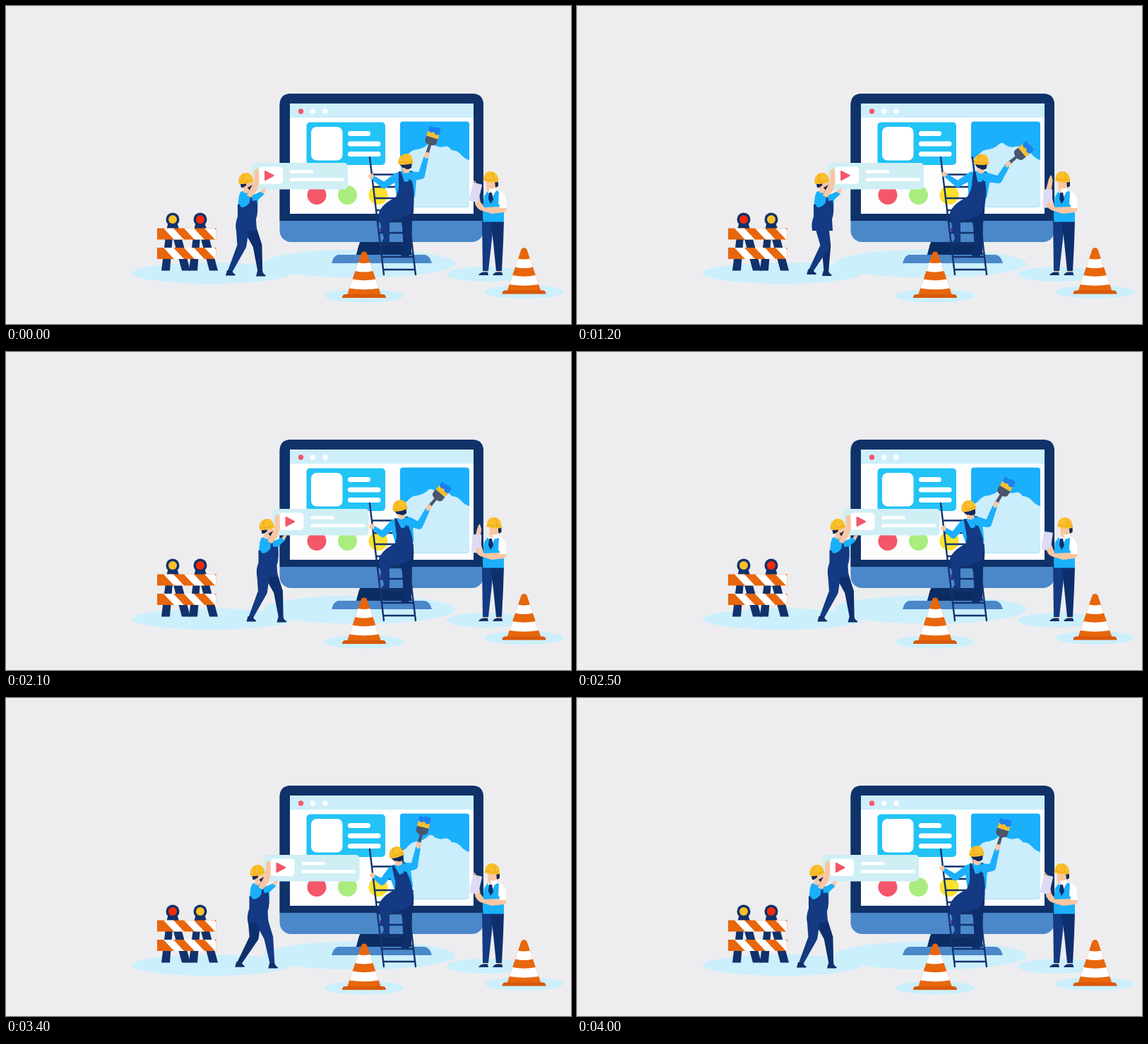
These frames come from a looping animation (800 by 450 pixels, 4.1 s). An HTML page:

```html
<!DOCTYPE html>
<html lang="en">
<head>
<meta charset="utf-8">
<title>Site under construction</title>
<style>
  html, body { margin: 0; width: 100%; height: 100%; overflow: hidden; background: #ededef; }
  svg { display: block; width: 800px; height: 450px; }
  .navy { fill: #11316b; }
  .denim { fill: #133a82; }
  .shade { fill: #0e2f6d; }
  .shirt { fill: #1bb0fb; }
  .skin { fill: #f9c6a3; }
  .white { fill: #fff; }
  .pale { fill: #cceffc; }
  .orange { fill: #e8660c; }
  .red { fill: #f4566a; }
</style>
</head>
<body>
<svg viewBox="0 0 800 450">
  <defs>
    <g id="helmet">
      <path fill="#fabf2b" d="M-10.5 5C-11-4-5-8 1-8C7-8 10-3 10 3L11.500 5Q0 9-10.500 7Z"/>
      <path fill="none" stroke="#e9a51d" stroke-width="1" d="M-10 4Q0 6 10 2.500M-2-7Q-5-3-4 3"/>
    </g>
    <g id="cone">
      <ellipse class="pale" cx="507" cy="410" rx="56" ry="9.500"/>
      <path class="orange" d="M503 350Q504 347.500 507 347.500T511 350L531 409H483Z"/>
      <path class="white" d="M498.600 363Q507 365 515.400 363L519.400 375Q507 378 494.600 375ZM490.700 386.500Q507 390 523.300 386.500L527.700 399.500Q507 403 486.300 399.500Z"/>
      <path fill="#d9580a" d="M476 413Q476 408 481 408H533Q538 408 538 413Z"/>
    </g>
    <g id="trestle">
      <path class="navy" d="M229 309H243L247 322L261 374.500H249L236 326L232 374.500H220L227 318Z"/>
      <circle class="navy" cx="236" cy="302" r="9.500"/>
    </g>
    <g id="stripes">
      <path class="orange" d="M214 314.500H297.500V330.500H214Z"/>
      <path class="white" d="M223 314.500H237L252 330.500H238ZM252 314.500H266L281 330.500H267ZM281 314.500H295L297.500 317V330.500H296Z"/>
    </g>
    <path id="shoe" class="navy" d="M-4-2H3Q4 2 8 4L7 5.500H-6Z"/>
    <clipPath id="photo"><rect x="558" y="163.500" width="98" height="121" rx="4"/></clipPath>
  </defs>

  <g class="pale">
    <ellipse cx="291" cy="378" rx="113" ry="15"/>
    <ellipse cx="500" cy="364.500" rx="136" ry="20"/>
    <ellipse cx="680" cy="379.500" rx="56" ry="10.500"/>
  </g>

  <!-- monitor -->
  <rect x="387.500" y="124" width="288.500" height="210" rx="16" fill="#4b88c9"/>
  <path fill="#0f3268" d="M387.500 304V140Q387.500 124 403.500 124H660Q676 124 676 140V304Z"/>
  <path fill="#0c2d63" d="M501 334H571L575 352.500H496Z"/>
  <path fill="#4b88c9" d="M470 352H593Q600 353 603 364H461Q464 353 470 352Z"/>
  <path fill="#0c2d63" d="M500 337H571L575 352H496Z"/>
  <rect x="402" y="138" width="260" height="156" fill="#fdfdfe"/>
  <rect x="402" y="138" width="260" height="20" fill="#cdeffb"/>
  <circle class="red" cx="417.500" cy="149" r="3.700"/>
  <g class="white"><circle cx="434.500" cy="149" r="3.700"/><circle cx="452" cy="149" r="3.700"/></g>

  <rect x="425.500" y="164.500" width="111.500" height="60.500" rx="5" fill="#23c3f6"/>
  <g class="white">
    <rect x="432" y="171" width="44.500" height="47.500" rx="8"/>
    <rect x="484" y="177" width="32" height="7" rx="3.500"/>
    <rect x="484" y="191.500" width="46.500" height="7" rx="3.500"/>
    <rect x="484" y="206" width="46.500" height="7" rx="3.500"/>
  </g>
  <g clip-path="url(#photo)">
    <path class="shirt" d="M558 163H656V285H558Z"/>
    <path fill="#ccedfb" d="M558 217Q565 215 570 209T583 203Q592 201 597 196T607 197Q614 201 620 199T631 204Q639 204 644 210T656 218V285H558Z"/>
  </g>
  <circle class="red" cx="440" cy="267.500" r="13.500"/>
  <circle fill="#aaed7e" cx="483.500" cy="267.500" r="13.500"/>
  <circle fill="#fbe12d" cx="527" cy="267.500" r="13.500"/>

  <!-- barricade -->
  <use href="#trestle"/><use href="#trestle" x="39"/>
  <circle id="lampL" cx="236" cy="302" r="6"/>
  <circle id="lampR" cx="275" cy="302" r="6"/>
  <use href="#stripes"/><use href="#stripes" y="27.500"/>

  <!-- carrier and video panel -->
  <g id="carrier">
    <rect x="348" y="222" width="136" height="37.500" rx="5" fill="#cfeff5"/>
    <g class="white">
      <rect x="357.500" y="227.500" width="34.500" height="24.500" rx="5"/>
      <rect x="402" y="232" width="33" height="4.700" rx="1.500"/>
      <rect x="402" y="243.300" width="76.500" height="4.700" rx="1.500"/>
    </g>
    <path class="red" stroke="#f4566a" stroke-width="2" stroke-linejoin="round" d="M367 234L378.500 240L367 246Z"/>
    <path class="shirt" d="M345 270L362 262L366 266L352 279Z"/>
    <path class="skin" d="M361 263L365 258L368 260L365 266Z"/>
    <path id="legB" class="shade"/><use id="shoeB" href="#shoe"/>
    <path id="legA" class="denim"/><use id="shoeA" href="#shoe"/>
    <path class="shirt" d="M332 263Q338 260 346 263L357 270L356 288L330 290Q327 275 332 263Z"/>
    <path class="denim" d="M328 280Q334 284 341 277L344 265L347 265L349 276L355 275Q358 290 354 302L355 318L326 318Q324 308 328 298Z"/>
    <path class="skin" d="M336 250H349V257Q347 262 343 262L342 266L336 264Z"/>
    <path fill="#14295a" d="M331 248H341L340 254Q336 258 333 257ZM342 257L349 253L348 259L345 261Z"/>
    <use href="#helmet" transform="translate(339.500 244) rotate(-4)"/>
    <path class="shirt" d="M330 274Q329 264 336 264L346 266L345 278Q338 287 332 284Z"/>
    <path class="skin" d="M341 268L351 249L351.500 233Q354 229 358 231L358.500 248L355 261L347 271Z"/>
  </g>

  <!-- ladder and painter -->
  <path id="ladder" fill="none" stroke="#14336e" stroke-width="2.400" stroke-linecap="round"/>
  <path class="shade" d="M556 288L577 276Q578 290 575 306L574 347L570 354H559L563 347L561 312Z"/>
  <ellipse cx="532" cy="317" rx="2.500" ry="3.500" fill="#3c2b86"/>
  <path class="denim" d="M553 270Q536 278 530 288Q526 294 529 303L535 329L531 335H543L543 329L543 304Q566 300 574 292L577 272Z"/>
  <path id="armL" class="shirt"/><circle id="handL" class="skin" r="3.700"/>
  <g id="torso">
    <path class="shirt" d="M549 243Q551 236 559 234L573 233Q580 236 581 244L579 270H553Z"/>
    <path class="denim" d="M556 234L559 234L564 249L570 248L573 233L576 234L575 250Q579 261 577 284L552 284Q548 276 553 268Q557 260 556 251Z"/>
    <path class="skin" d="M560 224H572L571 235Q566 238 562 235Z"/>
    <path fill="#14295a" d="M557 220H575L574 229Q568 233 564 229Q560 230 557 222Z"/>
    <use href="#helmet" x="566" y="217"/>
  </g>
  <path id="armR" class="shirt"/>
  <g id="brush">
    <path fill="#4a566c" d="M-2.500 2L-2-14Q-8-15-8.500-19V-25H8.500V-19Q8-15 2-14L2.500 2Z"/>
    <path fill="#1b80f2" d="M-8.500-28V-40L-3-39L2-41L8.500-40V-28Z"/>
    <path fill="#f8bf30" d="M-8.500-25V-33L-4-31L0-33L4-30L8.500-32V-25Z"/>
  </g>
  <path id="handR" class="skin"/>

  <!-- inspector -->
  <g class="skin"><path d="M676 372H682V378H676ZM695 372H701V378H695Z"/></g>
  <path class="navy" d="M669 381Q671 377 676 376.500H682L683 381ZM689 381Q691 377 695 376.500H702L703.500 381Z"/>
  <path class="denim" d="M674 304H690L688 330L683 375H675Z"/>
  <path class="shade" d="M686 304H705L704 335L702 375H694L690 335Z"/>
  <path class="white" d="M677 268Q680 262 688 261L699 262Q708 265 708 276L709 288L698 290L679 284Z"/>
  <path class="shirt" d="M677 269L682 262L687 274L694 261L698 263L697 280L705 287V305.500H675.500Q674 290 677 269Z"/>
  <path class="shade" d="M684 264H688L690 274L686 280L683 273Z"/>
  <g id="face">
    <path class="skin" d="M680 246H695L694 261Q690 265 686 264Q681 262 680 258Z"/>
    <path fill="#14295a" d="M692 247H697V255L693 257Z"/>
    <path class="white" d="M684 258Q690 260 693 256L694 262Q689 266 685 263Z"/>
    <use href="#helmet" transform="translate(686.500 242) scale(-1 1)"/>
  </g>
  <path id="raised" class="skin"/>
  <rect id="board" x="-6.500" y="-13" width="13" height="26" rx="1" fill="#dddbf4"/>
  <path id="pen" stroke="#f0c9a0" stroke-width="1.500" d="M662 247L669 255"/>
  <path class="skin" d="M708 283Q711 289 705 292L688 294L672 289Q666 286 665 280L668 276L672 281L677 285L698 284Z"/>
  <path class="white" d="M698 265Q706 264 707 274L709 286L699 286Z"/>

  <use href="#cone"/><use href="#cone" x="226.500" y="-5.500"/>
</svg>
<script>
const LOOP = 4100, STEP = 100, CYCLE = 4000;
const $ = id => document.getElementById(id);
const set = (id, name, value) => $(id).setAttribute(name, value);
const clamp = v => Math.min(1, Math.max(0, v));
const mix = (a, b, k) => a.map((v, i) => v + (b[i] - v) * k);

const times = [0, 500, 1200, 2100, 2900, 3400];
const keys = {
  lean: [0, 6, 6, -7.5, -12, -12],
  handX: [596, 608.5, 611, 599, 588, 584.5],
  handY: [210, 217, 223, 219, 210, 207],
  elbowX: [588, 593, 597, 585, 580, 578],
  elbowY: [240, 245, 246, 246, 240, 238],
  brush: [17, 38, 50, 40, 21, 13.5],
  gripX: [517, 520, 520, 518, 520, 519],
  gripY: [241, 238, 238, 247, 251, 251],
  head: [0, 0, 1, 4.5, 4, 2],
  raise: [0, 0.85, 1, 0.85, 0, 0]
};

// Smooth cyclic curve through the key values
function sample(name, t) {
  const v = keys[name], n = times.length;
  const at = i => v[(i + n) % n];
  const when = i => times[(i + n) % n] + Math.floor(i / n) * CYCLE;
  t %= CYCLE;
  let i = n - 1;
  while (times[i] > t) i--;
  const slope = j => (at(j + 1) - at(j - 1)) / (when(j + 1) - when(j - 1));
  const d = when(i + 1) - when(i), u = (t - when(i)) / d, w = 1 - u;
  return (1 + 2 * u) * w * w * at(i) + u * w * w * d * slope(i)
    + u * u * (3 - 2 * u) * at(i + 1) - u * u * w * d * slope(i + 1);
}

// Tapered limb with round joints
function limb(points, widths) {
  let d = "";
  points.forEach(([x, y], i) => {
    const r = widths[i] / 2;
    d += `M${x - r} ${y}a${r} ${r} 0 1 0 ${2 * r} 0a${r} ${r} 0 1 0 ${-2 * r} 0Z`;
    if (!i) return;
    const [px, py] = points[i - 1], q = widths[i - 1] / 2;
    const len = Math.hypot(x - px, y - py) || 1;
    const nx = (py - y) / len, ny = (x - px) / len;
    d += `M${px + nx * q} ${py + ny * q}L${x + nx * r} ${y + ny * r}`
      + `L${x - nx * r} ${y - ny * r}L${px - nx * q} ${py - ny * q}Z`;
  });
  return d;
}

function leg(id, cos, sin) {
  const k = (1 - cos) / 2;
  const knee = mix([334, 339], [356, 339], k);
  const ankle = mix([317, 376], [360, 377], k);
  ankle[0] -= sin > 0 ? 13 * sin : 6 * sin;
  ankle[1] -= Math.max(0, 2 * sin);
  set("leg" + id, "d", limb([mix([335, 311], [344, 311], k), knee, ankle], [19, 13, 6.5]));
  set("shoe" + id, "transform", `translate(${ankle})`);
}

function carrier(t) {
  const p = clamp((t - 960) / 1000) - clamp((t - 2960) / 1000);
  const a = p * 2 * Math.PI;
  set("carrier", "transform", `translate(${29.5 * p} 0)`);
  leg("A", Math.cos(a), Math.sin(a));
  leg("B", -Math.cos(a), -Math.sin(a));
}

function painter(t) {
  const lean = sample("lean", t), a = lean * Math.PI / 180;
  const turn = (x, y) => [
    565 + (x - 565) * Math.cos(a) - (y - 282) * Math.sin(a),
    282 + (x - 565) * Math.sin(a) + (y - 282) * Math.cos(a)
  ];
  const hand = [sample("handX", t), sample("handY", t)];
  const elbow = [sample("elbowX", t), sample("elbowY", t)];
  const grip = [sample("gripX", t), sample("gripY", t)];
  const left = turn(554, 241), right = turn(576, 241);
  const bend = mix(left, grip, 0.5);
  bend[1] += 13;
  set("torso", "transform", `rotate(${lean} 565 282)`);
  set("armL", "d", limb([left, bend, mix(bend, grip, 0.85)], [11, 9, 6]));
  set("handL", "cx", grip[0]);
  set("handL", "cy", grip[1]);
  set("armR", "d", limb([right, elbow, mix(elbow, hand, 0.82)], [13, 10, 7]));
  set("handR", "d", limb([mix(elbow, hand, 0.88), hand], [5, 6.5]));
  set("brush", "transform", `translate(${hand}) rotate(${sample("brush", t)})`);
}

function inspector(t) {
  const up = clamp(sample("raise", t));
  const hand = mix([668, 272], [670.5, 247], up);
  const tip = mix([667, 268], [671, 241], up);
  const board = mix([665, 264], [666.5, 272.5], up);
  set("face", "transform", `translate(${sample("head", t)} 0)`);
  set("raised", "d", limb([[672, 284], mix([668, 279], [667, 265], up), hand, tip], [8, 8, 6, 2.5]));
  set("board", "transform", `translate(${board}) rotate(${13 - 12 * up})`);
  set("pen", "opacity", up < 0.3 ? 1 : 0);
}

function lamps(t) {
  const swap = Math.floor(t / 1000) % 2;
  const colors = ["#fbbf28", "#f32a05"];
  set("lampL", "fill", colors[swap]);
  set("lampR", "fill", colors[1 - swap]);
}

let rungs = "M515 214L535 380M560 214L580 380";
for (const y of [238.5, 256, 272, 289, 305, 321, 337, 355, 373])
  rungs += `M${515 + (y - 214) * 0.12} ${y}h45`;
set("ladder", "d", rungs);

const start = performance.now();
let last = -1;
function tick() {
  const t = Math.floor((performance.now() - start) % LOOP / STEP) * STEP;
  if (t !== last) {
    last = t;
    for (const draw of [carrier, painter, inspector, lamps]) draw(t);
  }
  requestAnimationFrame(tick);
}
tick();
</script>
</body>
</html>
```
